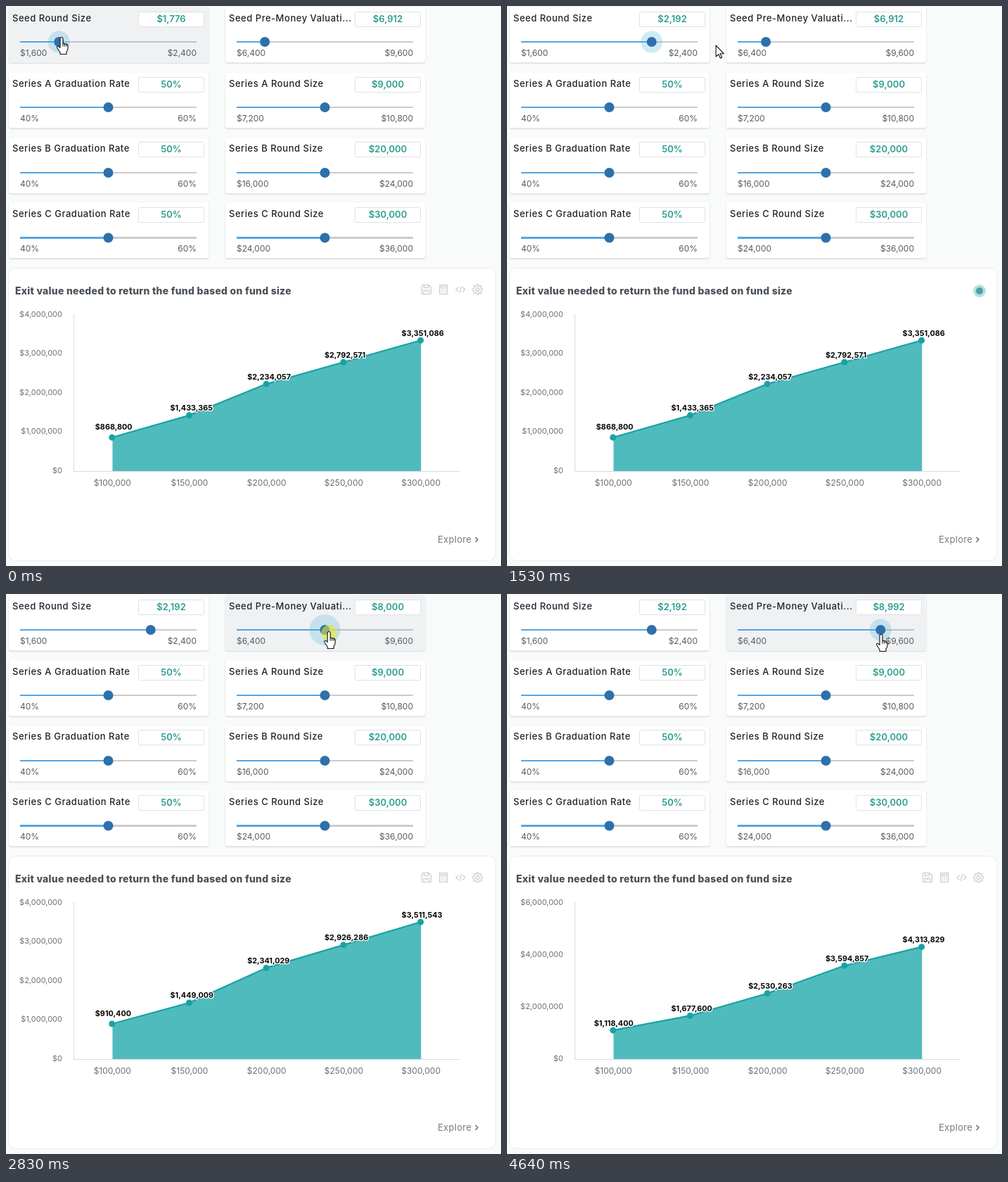
Write an HTML page with a canvas that moves like this. It is 704 by 796 pixels and loops after 5330 ms.

```html
<!DOCTYPE html>
<html lang="en">
<head>
<meta charset="utf-8">
<title>Fund model</title>
<style>
  html, body { margin: 0; width: 100%; height: 100%; overflow: hidden; background: #f9fbfb; }
  canvas { display: block; width: 704px; height: 796px; }
</style>
</head>
<body>
<canvas id="stage" width="704" height="796"></canvas>
<script>
const ctx = document.getElementById('stage').getContext('2d');
const LOOP = 5330;
const TEAL = '#17a3a4';
const FAMILY = 'Inter, "Open Sans", sans-serif';

// Keys are [time, value] pairs with straight moves between them.
function track(keys, t) {
  if (t <= keys[0][0]) return keys[0][1];
  for (let i = 1; i < keys.length; i++) {
    const [t0, a] = keys[i - 1], [t1, b] = keys[i];
    if (t <= t1) return a + (b - a) * (t - t0) / (t1 - t0);
  }
  return keys[keys.length - 1][1];
}
const clamp = v => Math.max(0, Math.min(1, v));
const cubicOut = p => 1 - (1 - clamp(p)) ** 3;
const within = (t, a, b) => t >= a && t < b;
const money = v => '$' + Math.round(v).toLocaleString('en-US');
const percent = v => v + '%';

const SEED_SIZE = [[0, 1776], [140, 1776], [630, 2064], [1030, 2192]];
const SEED_VALUATION = [[2190, 6912], [2280, 6976], [2350, 7060], [2610, 7390],
  [2775, 7390], [2830, 8000], [3050, 8640], [3180, 8640], [3390, 8992]];
const HALO_SIZE = [[120, 15.5], [260, 22], [1040, 22], [1180, 15.5], [2330, 15.5], [2480, 6]];
const HALO_VALUATION = [[2120, 6], [2190, 14.5], [2280, 15], [2410, 22], [3370, 22], [3470, 15.5]];
const POINTER_X = [[120, 81], [630, 170], [1030, 210], [1250, 210], [1530, 297], [2120, 371],
  [2280, 376], [2350, 382], [2610, 413], [2775, 413], [2830, 461], [3050, 512], [3180, 512], [3390, 534]];
const POINTER_Y = [[120, 46], [630, 51], [1030, 55], [1530, 56], [2280, 53], [2610, 55], [2830, 55], [3390, 59]];
const PRESSES = [[140, 1040], [2200, 3380]];
const LOADS = [[1100, 1810], [3400, 4110]];

const RESULTS = [
  { max: 4e6, step: 1e6, values: [868800, 1433365, 2234057, 2792571, 3351086] },
  { max: 4e6, step: 1e6, values: [910400, 1449009, 2341029, 2926286, 3511543] },
  { max: 6e6, step: 2e6, values: [1118400, 1677600, 2530263, 3594857, 4313829] }
];

const SLIDERS = [
  { col: 0, row: 0, name: 'Seed Round Size', min: 1600, max: 2400, step: 16, keys: SEED_SIZE, halo: HALO_SIZE },
  { col: 1, row: 0, name: 'Seed Pre-Money Valuati...', min: 6400, max: 9600, step: 32, keys: SEED_VALUATION, halo: HALO_VALUATION }
];
[['A', 9000], ['B', 20000], ['C', 30000]].forEach(([series, size], i) => {
  SLIDERS.push({ col: 0, row: i + 1, name: `Series ${series} Graduation Rate`, min: 40, max: 60, value: 50, format: percent });
  SLIDERS.push({ col: 1, row: i + 1, name: `Series ${series} Round Size`, min: size * 0.8, max: size * 1.2, value: size });
});

function text(str, x, y, font, color, align = 'left', spacing = 0) {
  ctx.font = `${font} ${FAMILY}`;
  ctx.letterSpacing = spacing + 'px';
  ctx.textAlign = align;
  ctx.fillStyle = color;
  ctx.fillText(str, x, y);
}

function disc(x, y, r, color) {
  ctx.fillStyle = color;
  ctx.beginPath();
  ctx.arc(x, y, r, 0, Math.PI * 2);
  ctx.fill();
}

function line(x0, y0, x1, y1, width, color) {
  ctx.strokeStyle = color;
  ctx.lineWidth = width;
  ctx.beginPath();
  ctx.moveTo(x0, y0);
  ctx.lineTo(x1, y1);
  ctx.stroke();
}

function panel(x, y, w, h, r, fill, border) {
  ctx.beginPath();
  ctx.roundRect(x, y, w, h, r);
  ctx.fillStyle = fill;
  ctx.fill();
  if (border) {
    ctx.strokeStyle = border;
    ctx.lineWidth = 1;
    ctx.stroke();
  }
}

function drawSlider(s, t, hover) {
  const format = s.format || money;
  const value = s.keys ? Math.round(track(s.keys, t) / s.step) * s.step : s.value;
  const thumb = 20 + 251 * (value - s.min) / (s.max - s.min);
  const top = s.row * 92.8;
  const cardY = Math.round(top), headY = Math.round(s.row * 92.6);
  // The track's edges snap to whole pixels.
  const trackY = Math.round(50 + top), trackH = Math.round(52.2 + top) - trackY;
  const midY = trackY + trackH / 2;
  ctx.save();
  ctx.translate(s.col * 308, 0);

  ctx.shadowColor = 'rgba(40,50,70,0.22)';
  ctx.shadowBlur = 2;
  ctx.shadowOffsetY = 1;
  panel(4, cardY + 1.5, 284, 79, 3, '#fff');
  ctx.shadowColor = 'transparent';
  if (hover > 0) panel(4, cardY + 1.5, 284, 79, 3, `rgba(240,241,243,${hover})`);

  text(s.name, 9, headY + 22, '500 13px', '#202428', 'left', 0.52);
  panel(188.5, headY + 8.5, 93, 21, 1, '#fff', '#dee2e6');
  text(format(value), 235, headY + 23, '600 13px', '#2c9d90', 'center');
  text(format(s.min), 20, cardY + 71, '400 12px', '#555b61');
  text(format(s.max), 271, cardY + 71, '400 12px', '#555b61', 'right');

  ctx.fillStyle = hover > 0.5 ? '#c0c2c5' : '#cacccd';
  ctx.fillRect(20, trackY, 251, trackH);
  ctx.fillStyle = '#55a6e4';
  ctx.fillRect(20, trackY, thumb - 20, trackH);
  if (s.halo) {
    const r = track(s.halo, t);
    if (r > 7) disc(thumb, midY, r, 'rgba(64,170,212,0.24)');
  }
  disc(thumb, midY, 7, '#2e70ab');
  ctx.restore();
}

const ICONS = [
  'M1.5 .5H10L13.5 4V12.5Q13.5 13.5 12.5 13.5H1.5Q.5 13.5 .5 12.5V1.5Q.5 .5 1.5 .5ZM3.5 .5V4.5H9.5V.5M3 13V8H11V13M5 10H9',
  'M1.5 .5H12.5V13.5H1.5ZM3.5 2.5H10.5V5H3.5ZM3.5 7.5H5M6.3 7.5H7.8M9.2 7.5H10.7M3.5 9.5H5M6.3 9.5H7.8M9.2 9.5H10.7M3.5 11.5H5M6.3 11.5H7.8M9.2 11.5H10.7',
  'M4 3.5L.5 7L4 10.5M10 3.5L13.5 7L10 10.5M8.3 2L5.7 12'
].map(d => new Path2D(d));
ICONS.push(gearIcon());

function gearIcon() {
  const path = new Path2D();
  for (let i = 0; i < 64; i++) {
    const a = i / 64 * Math.PI * 2;
    const r = 6.2 + 1.1 * Math.tanh(3 * Math.cos(a * 8));
    path.lineTo(7 + r * Math.cos(a), 7 + r * Math.sin(a));
  }
  path.closePath();
  path.moveTo(9.4, 7);
  path.arc(7, 7, 2.4, 0, Math.PI * 2);
  return path;
}

function drawToolbar(t) {
  const load = LOADS.find(([a, b]) => within(t, a, b));
  if (load) {
    const age = (t - load[0]) / 1000;
    disc(672, 405, 5 + 9 * age, `rgba(40,160,150,${0.5 - 0.4 * age})`);
    disc(672, 405, 5, '#49a3a8');
    return;
  }
  ctx.save();
  ctx.strokeStyle = '#c3cad2';
  ctx.lineWidth = 1.1;
  const ended = LOADS.filter(l => t >= l[1]).pop();
  if (ended) ctx.globalAlpha = clamp((t - ended[1]) / 150);
  ctx.translate(591, 396);
  for (const icon of ICONS) {
    ctx.stroke(icon);
    ctx.translate(24.2, 0);
  }
  ctx.restore();
}

const BASE = 661, PLOT = 222.5;
const pointX = i => 150.8 + 109.7 * i;
const pointY = (result, i) => BASE + 0.6 - PLOT * result.values[i] / result.max;

function drawChart(t) {
  panel(3.5, 372.5, 693, 416, 10, '#fff', '#e8ecee');
  text('Exit value needed to return the fund based on fund size', 13, 410, '800 14px', '#495057', 'left', 0.24);
  drawToolbar(t);

  const index = LOADS.filter(l => t >= l[1]).length;
  const result = RESULTS[index];
  const from = RESULTS[Math.max(0, index - 1)];
  const p = index ? cubicOut((t - LOADS[index - 1][1]) / 510) : 1;
  const points = result.values.map((v, i) => {
    const y0 = pointY(from, i);
    return [pointX(i), y0 + (pointY(result, i) - y0) * p];
  });

  for (let v = 0; v <= result.max; v += result.step) {
    text(money(v), 80, BASE + 3 - PLOT * v / result.max, '400 11px', '#6a6f75', 'right');
  }
  line(96.5, 438, 96.5, BASE, 1.2, '#dcdfe9');
  line(96, BASE + 0.5, 645, BASE + 0.5, 1.2, '#d5dae3');

  ctx.beginPath();
  ctx.moveTo(pointX(0) + 0.7, BASE);
  points.forEach(([x, y]) => ctx.lineTo(x + 0.7, y));
  ctx.lineTo(pointX(4) + 0.7, BASE);
  ctx.fillStyle = '#50bbbc';
  ctx.fill();

  ctx.beginPath();
  points.forEach(q => ctx.lineTo(...q));
  ctx.strokeStyle = TEAL;
  ctx.lineWidth = 2.2;
  ctx.lineJoin = 'round';
  ctx.stroke();

  points.forEach(([x, y], i) => {
    disc(x, y, 4.5, TEAL);
    text(money(50000 * (i + 2)), x + 0.5, 682, '400 12px', '#6a6f75', 'center');
  });
  points.forEach(([x, y], i) => {
    const label = money(result.values[i]);
    const short = label.length < 10;
    const lx = x - (short ? 24 : 27), ly = y - (short ? 11 : 6.5);
    ctx.font = '700 10.8px ' + FAMILY;
    ctx.letterSpacing = '0px';
    ctx.textAlign = 'left';
    ctx.strokeStyle = '#fff';
    ctx.lineWidth = 2.6;
    ctx.strokeText(label, lx, ly);
    text(label, lx, ly, '700 10.8px', '#050505');
  });

  text('Explore', 614, 763, '400 13px', '#757b82', 'left', 0.3);
  ctx.strokeStyle = '#75506c';
  ctx.lineWidth = 1.2;
  ctx.stroke(CHEVRON);
}

const CHEVRON = new Path2D('M667.5 755L671 758.5L667.5 762');
const HAND = new Path2D('M-4 .5A2 2 0 0 1 0 .5V7L5 8Q7 8.5 7 10.5V14Q7 17 5 19V22.5H-4V20L-8 14Q-9 12 -7.5 11.3Q-6 11 -4 13.5Z');
const KNUCKLES = new Path2D('M0 7V11.5M2.5 7.5V11.5M5 8V11.5');
const ARROW = new Path2D('M0 0V16L3.7 12.6L6.3 18.3L8.6 17.3L6 11.7H11.2Z');

function drawPointer(x, y, t) {
  if (PRESSES.some(([a, b]) => within(t, a, b))) disc(x - 1.5, y + 0.5, 11.5, 'rgba(234,232,42,0.58)');
  const overTrack = x < 279 || x > 320;
  ctx.save();
  ctx.translate(x, y);
  ctx.fillStyle = '#fff';
  ctx.strokeStyle = '#111';
  ctx.lineWidth = 1.1;
  const shape = overTrack ? HAND : ARROW;
  ctx.fill(shape);
  ctx.stroke(shape);
  if (overTrack) ctx.stroke(KNUCKLES);
  ctx.restore();
}

function draw(t) {
  const x = track(POINTER_X, t), y = track(POINTER_Y, t);
  ctx.fillStyle = '#f9fbfb';
  ctx.fillRect(0, 0, 704, 796);
  for (const s of SLIDERS) {
    const edge = s.col ? x - 312 : 288 - x;
    drawSlider(s, t, s.row ? 0 : clamp(edge / 8));
  }
  drawChart(t);
  drawPointer(x, y, t);
}

function tick() {
  draw(performance.now() % LOOP);
  requestAnimationFrame(tick);
}
tick();
</script>
</body>
</html>
```
